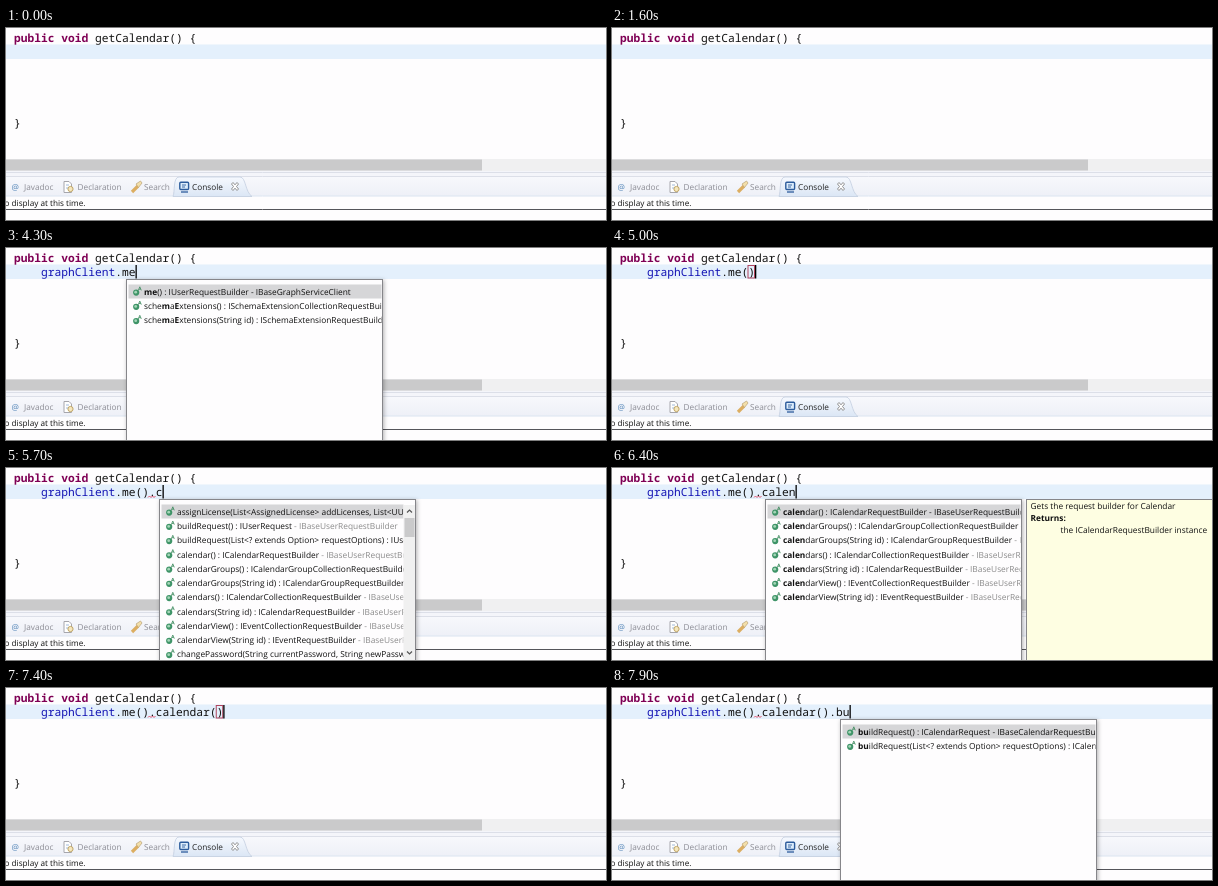
Write an HTML page that moves like this. It is 600 px wide and 192 px high and loops after 8 s.

```html
<!DOCTYPE html>
<html lang="en">
<head>
<meta charset="utf-8">
<title>Code completion</title>
<style>
  html, body { margin: 0; width: 100%; height: 100%; overflow: hidden; background: #fefdfe; }
  svg { display: block; }
  text { white-space: pre; text-rendering: geometricPrecision; }
  .code { font: 11.25px "Noto Sans Mono", monospace; fill: #111; }
  .key { font-weight: 700; fill: #7f0055; }
  .field { fill: #1414b4; }
  .ui { font: 8.35px "Open Sans", sans-serif; fill: #111; }
  .tab { font-size: 8.25px; fill: #8c8c94; }
  .dim { fill: #8a8a8a; }
  .b { font-weight: 700; }
  .shadow { filter: drop-shadow(1px 1px 2px rgba(0, 0, 0, .3)); }
</style>
</head>
<body>
<svg width="600" height="192" viewBox="0 0 600 192">
  <defs>
    <linearGradient id="bar" x2="0" y2="1">
      <stop offset="0" stop-color="#f7f8fc"/><stop offset="1" stop-color="#eef0f7"/>
    </linearGradient>
    <linearGradient id="active" x2="0" y2="1">
      <stop offset="0" stop-color="#f6f9fe"/><stop offset="1" stop-color="#dbe6f5"/>
    </linearGradient>
    <g id="method">
      <circle cx="3.2" cy="1" r="3.1" fill="#3f9468"/>
      <circle cx="2.7" cy=".6" r="1.4" fill="#a5d6b8"/>
      <path d="M5.3-1.2 6.8-4.8 8.3-1.2M5.9-2.4H7.7" fill="none" stroke="#3c8a5c" stroke-width=".8"/>
    </g>
  </defs>

  <rect width="600" height="192" fill="#fefdfe"/>
  <rect y="16.5" width="600" height="14.5" fill="#e4f0fc"/>
  <text class="code" x="8" y="13.6"><tspan class="key">public void</tspan> getCalendar() {</text>
  <text class="code" x="8" y="99">}</text>
  <g id="line"></g>

  <rect y="131" width="600" height="12" fill="#f0f0f1"/>
  <rect y="131.5" width="476" height="11" fill="#cacacb"/>
  <rect y="143" width="600" height="6" fill="#f4f5fa"/>
  <path d="M0 144.5H600" stroke="#dcdfe8"/>
  <rect y="148.5" width="600" height="20" fill="url(#bar)"/>
  <path d="M0 148.5H600" stroke="#dcdfe8"/>
  <rect y="168" width="600" height="24" fill="#fefdfe"/>
  <path d="M0 168H600" stroke="#dbe4f1"/>
  <path d="M0 181.500H600" stroke="#55555a"/>
  <path d="M167 168.5C169 164 167 149 173 149H234C240 149 239 164 246 168.5Z" fill="url(#active)" stroke="#c3cfe0" stroke-width=".8"/>

  <text class="ui tab" x="5.5" y="162" style="fill:#5486b8">@</text>
  <text class="ui tab" x="18" y="162.3">Javadoc</text>
  <g fill="#fff" stroke="#a6a6ac">
    <path d="M58 153.5H63L65.5 156V164.5H58Z"/>
    <circle cx="64.5" cy="161" r="2.6" fill="#f5e7bd" stroke="#c0a565"/>
    <path d="M60 157H63M60 160H62" stroke="#8ba9d0" stroke-width=".8"/>
  </g>
  <text class="ui tab" x="71.5" y="162.3">Declaration</text>
  <path d="M126 164 132 158" stroke="#dcae62" stroke-width="3.2"/>
  <path d="M130 156 134.5 153 136 155 132.5 159.5Z" fill="#f3dfa9" stroke="#b9a279" stroke-width=".7"/>
  <text class="ui tab" x="138" y="162.3">Search</text>
  <rect x="173.8" y="154.2" width="8.8" height="7.3" rx="1" fill="#dcecfb" stroke="#2d5c9c" stroke-width="1.4"/>
  <path d="M176 157H180M176 159H179" stroke="#2d5c9c" stroke-width=".9"/>
  <path d="M175 164H182" stroke="#2d5c9c" stroke-width="1.3"/>
  <text class="ui tab" x="186" y="162.3" style="fill:#222">Console</text>
  <path d="M225.5 156 227 154.5 229 156.8 231 154.5 232.5 156 230.5 158.5 232.5 161 231 162.5 229 160.2 227 162.5 225.5 161 227.5 158.5Z" fill="#fff" stroke="#777" stroke-width=".8"/>
  <text class="ui" x="-1.5" y="178" style="font-size:8.2px">o display at this time.</text>
  <g id="pop"></g>
</svg>

<script>
const LOOP = 8000, LEFT = 8, CW = 6.75, VISIBLE = 10;
const FIELD = 'graphClient';
const ME = FIELD + '.me()', CAL = ME + '.calendar()';

// Rows are "signature|owner"; * marks bold text.
const user = '| - IBaseUserRequestBuilder';
const calRows = [
  'calendar() : ICalendarRequestBuilder',
  'calendarGroups() : ICalendarGroupCollectionRequestBuilder',
  'calendarGroups(String id) : ICalendarGroupRequestBuilder',
  'calendars() : ICalendarCollectionRequestBuilder',
  'calendars(String id) : ICalendarRequestBuilder',
  'calendarView() : IEventCollectionRequestBuilder',
  'calendarView(String id) : IEventRequestBuilder'
].map(r => r + user);
const clientRows = [
  '*me*() : IUserRequestBuilder| - IBaseGraphServiceClient',
  'sche*m*a*E*xtensions() : ISchemaExtensionCollectionRequestBuilder',
  'sche*m*a*E*xtensions(String id) : ISchemaExtensionRequestBuilder'
];
const userRows = [
  'assignLicense(List<AssignedLicense> addLicenses, List<UUID> removeLicenses)',
  'buildRequest() : IUserRequest' + user,
  'buildRequest(List<? extends Option> requestOptions) : IUserRequest' + user,
  ...calRows,
  'changePassword(String currentPassword, String newPassword)'
];
const buildRows = [
  'buildRequest() : ICalendarRequest| - IBaseCalendarRequestBuilder',
  'buildRequest(List<? extends Option> requestOptions) : ICalendarRequest'
];
const match = (rows, s) => rows.map(r => r.replace(s, '*' + s + '*'));

// Each step: time, typed text, completion rows, documented type.
const steps = [[0, null], [1800, '']];
const type = (base, keys, times) =>
  times.forEach((t, i) => steps.push([t, base + keys.slice(0, i + 1)]));
const add = (...s) => steps.push(s);

type('', FIELD + '.', [2200, 2400, 2500, 2700, 2900, 3100, 3200, 3400, 3500, 3600, 3700, 3800]);
add(4100, FIELD + '.m', clientRows);
add(4200, FIELD + '.me', clientRows);
add(4600, FIELD + '.me', clientRows, 'User');
add(4900, ME);
add(5300, ME + '.');
add(5500, ME + '.', userRows);
add(5700, ME + '.c', userRows);
[[5900, 'ca'], [6000, 'cal'], [6100, 'cale'], [6200, 'calen']].forEach(([t, s]) =>
  add(t, ME + '.' + s, match(calRows, s)));
add(6300, ME + '.calen', match(calRows, 'calen'), 'Calendar');
add(6900, CAL);
add(7500, CAL + '.');
add(7700, CAL + '.b', match(buildRows, 'b'));
add(7800, CAL + '.bu', match(buildRows, 'bu'));

const esc = s => s.replace(/</g, '&lt;').replace(/>/g, '&gt;');
const bold = s => esc(s).replace(/\*(.+?)\*/g, '<tspan class="b">$1</tspan>');
const colX = n => LEFT + CW * n;

function codeLine(t, code) {
  if (code === null) return '';
  const end = colX(4 + code.length);
  let out = `<text class="code" x="${colX(4)}" y="27.8"><tspan class="field">${code.slice(0, FIELD.length)}</tspan>${code.slice(FIELD.length)}</text>`;
  if (t >= 5500)
    out += '<path d="M142 29.5 143.5 28 145 29.5 146.5 28 148 29.5 149.5 28" fill="none" stroke="#e0405c" stroke-width=".9"/>';
  if (code.endsWith(')'))
    out += `<rect x="${end - 7}" y="17.5" width="6.5" height="12.5" fill="none" stroke="#b0455e"/>`;
  return out + `<rect x="${end}" y="17" width="1.3" height="13.5" fill="#000"/>`;
}

const scrollbar = x => `<rect x="${x}" y="37" width="11.5" height="155" fill="#f0f0f0"/>
  <rect x="${x + 1}" y="50" width="10" height="19" fill="#cacacb"/>
  <path d="M${x + 3.5} 44.5l2.5-2.5 2.5 2.5M${x + 3.5} 183.500l2.5 2.5 2.5-2.5" fill="none" stroke="#555" stroke-width="1.2"/>`;

function popup(code, rows, doc) {
  if (!rows) return '';
  const x = Math.floor(colX(5 + code.lastIndexOf('.')) + 4) + .5;
  const scrolls = rows.length > VISIBLE, inner = scrolls ? 244 : 255;
  const list = rows.map((r, i) => {
    const y = 43.6 + i * 14.25, [sig, owner = ''] = r.split('|');
    return `<use href="#method" x="6.5" y="${y - 31.5}"/><text class="ui" x="17.5" y="${y - 28.2}">${bold(sig)}<tspan class="${i ? 'dim' : ''}">${owner}</tspan></text>`;
  }).join('');
  let out = `<rect class="shadow" x="${x}" y="31.5" width="256" height="170" fill="#fefdfe" stroke="#86868a"/>
    <rect x="${x + 2}" y="36.5" width="${inner - 2}" height="14" fill="#d6d6d8"/>
    <svg x="${x}" y="31.5" width="${inner}" height="161">${list}</svg>`;
  if (scrolls) out += scrollbar(x + inner);
  if (doc) {
    const dx = x + 261;
    out += `<rect x="${dx}" y="31.5" width="260" height="170" fill="#fefee2" stroke="#86868a"/>
      <text class="ui" x="${dx + 4}" y="41.3">Gets the request builder for ${doc}</text>
      <text class="ui b" x="${dx + 4}" y="53">Returns:</text>
      <text class="ui" x="${dx + 34}" y="64.5">the I${doc}RequestBuilder instance</text>`;
  }
  return out;
}

const line = document.getElementById('line'), pop = document.getElementById('pop');
const start = performance.now();
let shown;

function draw() {
  const t = (performance.now() - start) % LOOP;
  const step = steps.findLast(s => s[0] <= t);
  if (step !== shown) {
    shown = step;
    const [at, code, rows, doc] = step;
    line.innerHTML = codeLine(at, code);
    pop.innerHTML = popup(code, rows, doc);
  }
  requestAnimationFrame(draw);
}
draw();
</script>
</body>
</html>
```
